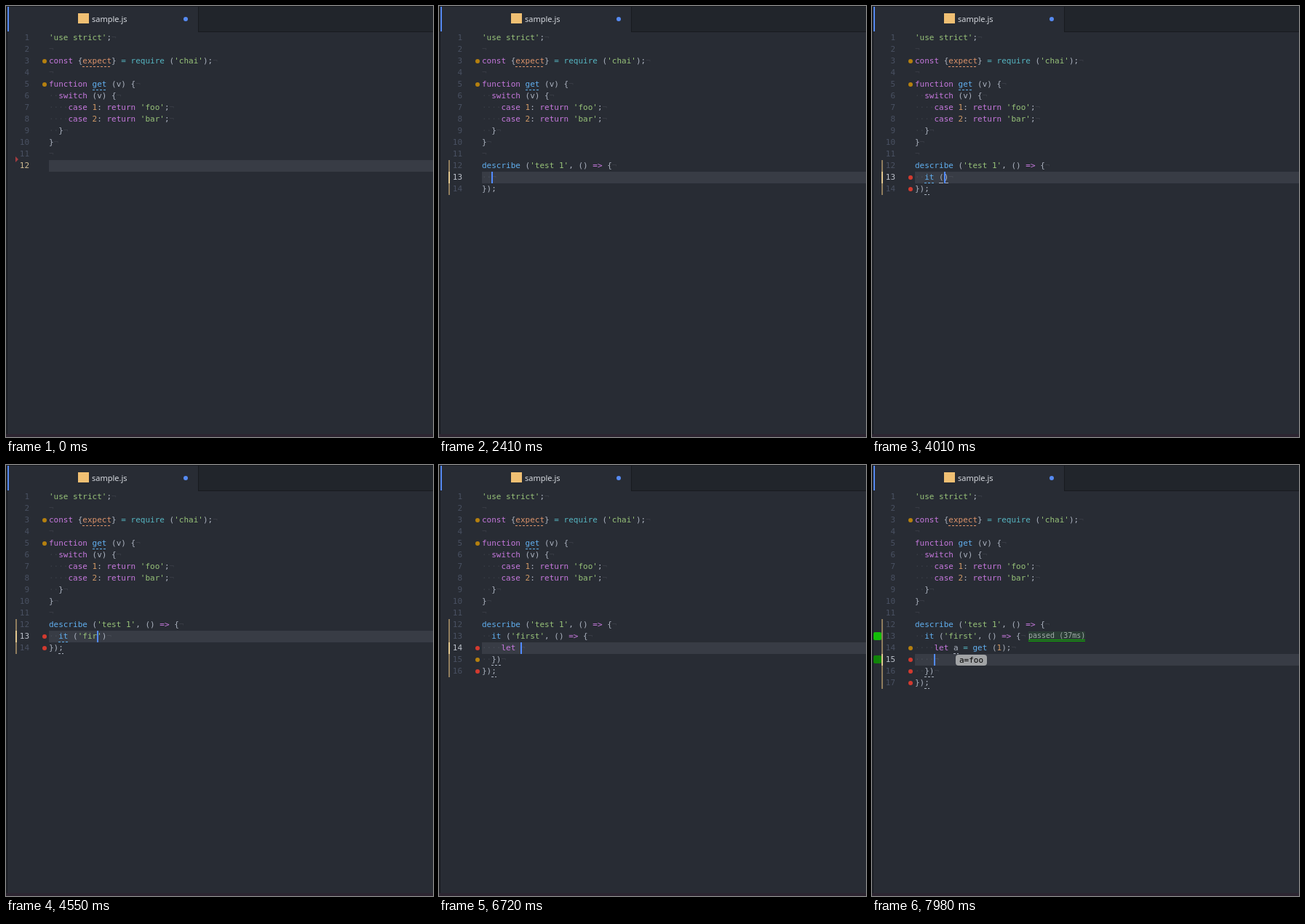
An HTML page with a canvas for the animation above (8 s loop, 587 by 593 pixels).

```html
<!DOCTYPE html>
<html lang="en">
<head>
<meta charset="utf-8">
<title>Editor</title>
<style>
  html, body { margin: 0; width: 100%; height: 100%; overflow: hidden; background: #282c34; }
  canvas { display: block; }
</style>
</head>
<body>
<canvas id="stage" width="587" height="593"></canvas>
<script>
const ctx = document.getElementById('stage').getContext('2d', { alpha: false });
const LOOP = 8000, LEFT = 59, ROW = 16, TOP = 36, CHAR = 6.622;
const MONO = '"DejaVu Sans Mono", monospace';
const GREY = '#abb2bf', FAINT = 'rgba(171,178,191,.13)';
const ORANGE = '#b5800f', RED = '#d33a2f';

const INTRO = `'use strict';

const {expect} = require ('chai');

function get (v) {
  switch (v) {
    case 1: return 'foo';
    case 2: return 'bar';
  }
}

`;

// [first key time, last key time, keys]
const TYPING = [
  [50, 980, "describe ('t"],
  [1120, 1520, "est 1',"],
  [1670, 2110, ' () => '],
  [2210, 2360, '{\n'],
  [3110, 3260, 'it'],
  [3810, 4010, ' ('],
  [4210, 5680, "'first', () => {"],
  [5870, 5870, '\n'],
  [6120, 6570, 'let '],
  [6770, 7500, 'a = get (1);'],
  [7600, 7600, '\n'],
];
const KEYS = TYPING.flatMap(([from, to, keys]) => [...keys].map((key, i) =>
  ({ key, time: from + (to - from) * i / Math.max(1, keys.length - 1) })));

// Linter marks: [line, colour, underline column, underline length]
const EXPECT = [3, ORANGE, 7, 6], GET = [5, ORANGE, 9, 3];
const LINT = [
  [0, EXPECT, GET],
  [1120, EXPECT, GET, [12, ORANGE, 0, 0]],
  [2360, EXPECT, GET],
  [2760, EXPECT, GET, [13, RED, 0, 0], [14, ORANGE, 0, 2]],
  [3610, EXPECT, GET, [13, RED, 2, 2], [14, RED, 2, 1]],
  [4940, [12, RED, 26, 1], [13, RED, 0, 0], [14, RED, 0, 3]],
  [5870, EXPECT, GET, [14, RED, 0, 0], [15, ORANGE, 2, 2], [16, RED, 2, 1]],
  [7600, EXPECT, [14, ORANGE, 8, 1], [15, RED, 0, 0], [16, RED, 2, 2], [17, RED, 2, 1]],
];

const SYNTAX = [
  [/'[^']*'?/y, '#98c379'],
  [/(const|function|switch|case|return|let)\b|=>/y, '#c678dd'],
  [/require|=/y, '#56b6c2'],
  [/expect/y, '#dc936a'],
  [/\w+(?= \()/y, '#61afef'],
  [/\d+/y, '#d19a66'],
  [/\w+|[^\w\s]/y, GREY],
];
const PAIRS = { '(': ')', '{': '}', "'": "'" };

const rowTop = line => TOP + (line - 1) * ROW;
const colX = col => LEFT + col * CHAR;

function rect(x, y, w, h, color) {
  ctx.fillStyle = color;
  ctx.fillRect(x, y, w, h);
}
function rounded(x, y, w, h, r, color) {
  ctx.fillStyle = color;
  ctx.beginPath();
  ctx.roundRect(x, y, w, h, r);
  ctx.fill();
}
function text(s, x, y, color, font = '11px ' + MONO) {
  ctx.font = font;
  ctx.fillStyle = color;
  ctx.fillText(s, x, y);
}

// Text before and after the cursor, with auto-closed pairs and auto-indent
function bufferAt(t) {
  let head = '', tail = '';
  for (const { key, time } of KEYS) {
    if (time > t) break;
    if (key === '\n') {
      const indent = head.split('\n').pop().match(/^ */)[0];
      head += '\n' + indent;
      if (tail[0] === '}') {
        head += '  ';
        tail = '\n' + indent + tail + (indent ? '' : ';');
      }
    } else {
      head += key;
      if (")}'".includes(key) && tail[0] === key) tail = tail.slice(1);
      else if (PAIRS[key]) tail = PAIRS[key] + tail;
    }
  }
  return { head, tail };
}

function openerColumn(line, closer) {
  let depth = 1;
  for (let i = line.length - 1; i >= 0; i--) {
    if (line[i] === closer) depth++;
    else if (PAIRS[line[i]] === closer && !--depth) return i;
  }
  return -1;
}

function drawLine(line, number, isLast) {
  const y = rowTop(number) + 11;
  const indent = line.match(/^ */)[0].length;
  text('·'.repeat(indent), LEFT, y, FAINT);
  for (let i = indent; i < line.length;) {
    let size = 1;
    for (const [pattern, color] of SYNTAX) {
      pattern.lastIndex = i;
      const match = pattern.exec(line);
      if (!match) continue;
      text(match[0], colX(i), y, color);
      size = match[0].length;
      break;
    }
    i += size;
  }
  if (!isLast) text('¬', colX(line.length), y, FAINT);
}

function drawFrameParts() {
  rect(0, 0, 587, 593, '#282c34');
  rect(0, 0, 587, 36, '#21252b');
  rect(0, 35, 587, 1, '#181a1f');
  rect(2, 1, 262, 35, '#282c34');
  rect(264, 1, 1, 35, '#181a1f');
  rect(0, 0, 587, 1, '#181a1f');
  rect(0, 0, 1, 593, '#21252b');
  rect(1, 0, 1, 593, '#181a1f');
  rect(2, 1, 2, 34, '#568af2');
  rect(0, 589, 587, 4, '#2d2531');
  rect(99, 10, 15, 14, '#f0c073');
  text('sample.js', 118, 22, '#d7dae0', '11px "Noto Sans", sans-serif');
  rounded(244, 15, 6, 6, 3, '#568af2');
}

function drawLint(t, lines) {
  const [, ...marks] = LINT.findLast(([time]) => time <= t);
  for (const [line, color, col, length] of marks) {
    const y = rowTop(line);
    rounded(50, y + 5, 6, 6, 3, color);
    const word = lines[line - 1].slice(col, col + length);
    ctx.strokeStyle = word === 'expect' ? '#dc936a' : /^(get|it)$/.test(word) ? '#61afef' : GREY;
    ctx.setLineDash([3, 2]);
    ctx.beginPath();
    ctx.moveTo(Math.round(colX(col)), y + 15.5);
    ctx.lineTo(Math.round(colX(col + length)), y + 15.5);
    ctx.stroke();
  }
}

function drawResults() {
  rounded(2, 230, 11, 11, 2, '#12bd08');
  rounded(2, 262, 11, 11, 2, '#108408');
  rect(215, 229, 78, 14, '#2b3d36');
  text('passed (37ms)', 215, 238, '#a0aaa8', '10px ' + MONO);
  rect(215, 240, 78, 1, '#12a008');
  rect(215, 242, 78, 1, '#12a008');
  rounded(115, 261, 43, 15, 4, '#a2a4a6');
  text('a=foo', 120, 272, '#000');
}

function draw(t) {
  const { head, tail } = bufferAt(t);
  const lines = (INTRO + head + tail).split('\n');
  const before = (INTRO + head).split('\n');
  const active = before.length, current = before[active - 1], y = rowTop(active);

  drawFrameParts();
  rect(LEFT, y, 528, ROW, '#383c45');
  lines.forEach((line, i) => {
    const number = i + 1, isActive = number === active;
    ctx.textAlign = 'right';
    text(number, 32, rowTop(number) + 11,
      !isActive ? '#495162' : active === 12 ? '#d0bd94' : '#bcc1ca');
    ctx.textAlign = 'left';
    drawLine(line, number, number === lines.length);
    if (number >= 12 && head) rect(13, rowTop(number), 2, ROW, isActive ? '#e2c78f' : '#8f7d5d');
  });
  drawLint(t, lines);

  if (tail[0] === ')' || tail[0] === '}')
    for (const col of [openerColumn(current, tail[0]), current.length])
      rect(Math.round(colX(col)), y + 15, 6, 1, GREY);

  if (head) {
    rect(Math.round(colX(current.length)), y, 2, ROW, '#528bff');
  } else {
    ctx.fillStyle = '#a33c40';
    ctx.beginPath();
    ctx.moveTo(13, 207);
    ctx.lineTo(17, 211);
    ctx.lineTo(13, 215);
    ctx.fill();
  }
  if (t >= 7800) drawResults();
}

function tick(now) {
  draw(now % LOOP);
  requestAnimationFrame(tick);
}
tick(performance.now());
</script>
</body>
</html>
```
